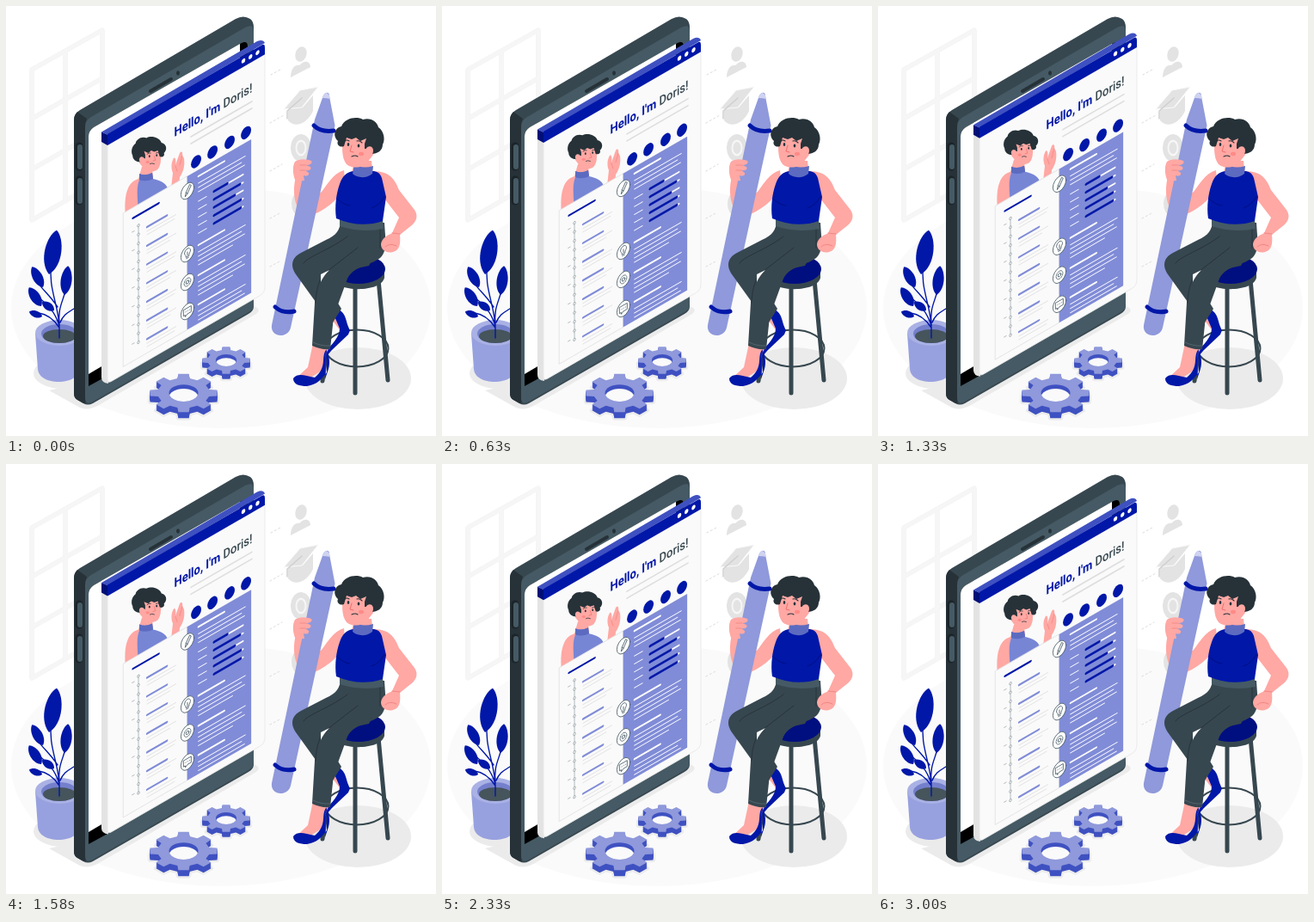
An HTML page for the animation above (3040 ms loop, 500 by 500 pixels).

```html
<!DOCTYPE html>
<html lang="en">
<head>
<meta charset="utf-8">
<title>Online resume</title>
<style>
html, body { margin: 0; width: 100%; height: 100%; overflow: hidden; background: #fff; }
svg { display: block; width: 100vw; height: 100vh; }
text { font: 700 15px Roboto, Arial, sans-serif; }
tspan { font-weight: 500; }
.blue { fill: #0017a8; }
.lilac { fill: #8f99db; }
.skin { fill: #ffa8a4; }
.dark { fill: #37474f; }
.ink { fill: #263238; }
.grey { fill: #e3e3e3; }
.line { fill: none; stroke-linecap: round; stroke-linejoin: round; }
</style>
</head>
<body>
<svg viewBox="0 0 500 500">
  <ellipse cx="250" cy="351" rx="244" ry="140" fill="#fafafa"/>

  <!-- window -->
  <g class="line" stroke="#ebebeb" stroke-width="5">
    <path id="frame" d="M30 74 112 28V202L30 249ZM69 52V227M30 131 112 84M30 190 112 143"/>
    <use href="#frame" stroke="#f6f6f6"/>
  </g>

  <!-- floor shadows -->
  <g fill="#ebebeb">
    <ellipse cx="66" cy="427" rx="34" ry="18"/>
    <path d="M50 447 86 467Q96 471 108 464L291 358Q296 354 292 351L284 347 80 440Z"/>
    <ellipse cx="409" cy="433" rx="62" ry="36"/>
  </g>

  <!-- faint career icons -->
  <path class="line" d="M308 80l13-7M307 136l16-9M307 192l14-8M307 247l13-7M307 303l13-7" stroke="#dcdcdc" stroke-dasharray="2 3"/>
  <g class="grey">
    <ellipse cx="343" cy="56" rx="6.5" ry="9" transform="rotate(18 343 56)"/>
    <path d="M331 83C331 73 336 68 341 69 347 62 354 64 354 71Z"/>
    <path d="M328 119 345 118 357 104V122C350 138 335 142 328 133Z"/>
    <path d="M323 120 342 98 363 94 344 118Z" stroke="#fafafa"/>
    <path class="line" d="M344 107 327 122V131" stroke="#cfcfcf" stroke-width="1.5"/>
    <ellipse class="line" cx="343" cy="165" rx="10" ry="14" stroke="#e3e3e3" stroke-width="4" stroke-dasharray="4 2"/>
    <ellipse cx="343" cy="165" rx="9" ry="12.500"/>
    <ellipse cx="343" cy="165" rx="6.500" ry="9.500" fill="#f6f6f6"/>
    <ellipse cx="343" cy="165" rx="4.500" ry="7"/>
    <ellipse cx="340" cy="230" rx="8" ry="13"/>
    <ellipse cx="340" cy="288" rx="8" ry="12"/>
  </g>

  <!-- plant -->
  <path d="M34 381 37 422C38 442 84 442 86 422L90 381Z" fill="#98a1df"/>
  <ellipse cx="62" cy="380" rx="28" ry="15" fill="#a9b1e5"/>
  <ellipse cx="62" cy="381" rx="21" ry="11" fill="#7480cc"/>
  <ellipse cx="62" cy="384" rx="19" ry="8" fill="#46545c"/>
  <path class="line" d="M62 386C64 350 48 330 53 300M62 372C60 350 66 345 70 328M60 350C50 335 42 330 36 320M62 372C56 352 45 345 37 338M62 374C54 362 46 358 38 357M63 368C67 358 73 356 79 352" stroke="#0017a8" stroke-width="1.4"/>
  <g id="leaves" class="blue"></g>

  <!-- tablet -->
  <path class="dark" d="M79 133Q79 125 86 121L267 15Q276 10 284 15 288 18 288 25V349Q288 355 282 358L101 462Q95 465 90 462L83 458Q79 456 79 450Z"/>
  <path class="ink" d="M79 133Q79 127 83 123L94 131Q92 135 92 141V458Q94 463 90 462L83 458Q79 456 79 450Z"/>
  <path d="M92 141Q92 133 99 129L278 25Q288 20 288 29V346Q288 353 282 356L101 460Q92 465 92 455Z" fill="#455a64"/>
  <path d="M96 152Q96 145 102 141L274 43Q281 40 281 47V334L100 439Q96 441 96 437Z"/>
  <path d="M96 152Q96 145 102 141L272 44V334L96 435Z" fill="#fff"/>
  <path d="M96 428 118 415V430L96 442Z"/>
  <path class="line" d="M168 99 192 85" stroke="#263238" stroke-width="4"/>
  <ellipse class="ink" cx="200" cy="78" rx="2" ry="2.7"/>
  <path class="line" d="M85 163V187M85 202V227" stroke="#1b2429" stroke-width="9"/>
  <path class="line" d="M86 164V187M86 203V227" stroke="#455a64" stroke-width="6"/>

  <!-- floating page -->
  <g id="page">
    <path d="M111 157 119 162V439Q111 438 111 432Z" fill="#e3e3e3"/>
    <path d="M111 146.500 118 149.500V162L111 158Z" fill="#000f78"/>
    <path d="M111 146.500 292 41Q299 38 301 43L118 150Z" fill="#3f51c1"/>
    <g id="sheet" transform="matrix(.866 -.5 0 1 118 162)">
      <path d="M0 0H211.300V271Q211 277 205 277H5Q0 277 0 272Z" fill="#fafafa" stroke="#e6e6e6" stroke-width=".8"/>
      <path class="blue" d="M0-13H207Q211.300-13 211.300-8V0H0Z"/>
      <g fill="#fff"><circle cx="182.500" cy="-7" r="2.600"/><circle cx="192" cy="-7" r="2.600"/><circle cx="201.500" cy="-7" r="2.600"/></g>
      <text class="blue" x="89.500" y="35">Hello, I'm <tspan class="dark">Doris!</tspan></text>
      <g class="blue"><circle cx="119" cy="78.400" r="6.900"/><circle cx="141" cy="78.400" r="6.900"/><circle cx="164" cy="78.400" r="6.900"/><circle cx="186" cy="78.400" r="6.900"/></g>
    </g>
    <path class="skin" d="M139 245C137 222 140 205 154 201L158 187H170L171 202 184 208 160 245Z"/>
    <path d="M155 195Q162 198 170 194L171 201C180 203 186 206 188 212V235L153 245C155 230 150 215 155 202Z" fill="#7785d5"/>
    <path d="M155 195Q162 198 170 194L171 201Q163 205 155 202Z" fill="#5c6bc0"/>
    <use href="#head" transform="matrix(-.7 0 0 .7 453.800 61)"/>
    <path class="skin" d="M192 212 194 194C191 187 193 180 195 177 197 175 198 180 197 185L202 171C204 168 206 170 205 174L207 177C208 184 207 192 202 199L201 212Z"/>
    <path class="line" d="M197 186 199 192M205 174 202 185" stroke="#f0837f" stroke-width=".7"/>
    <g id="cards" transform="matrix(.866 -.5 0 1 118 162)"></g>
  </g>

  <g id="gears"></g>

  <!-- far arm, then the pencil it holds -->
  <path class="skin" d="M393 191C380 195 374 207 367 216L353 226 355 200 344 189 336 203C332 225 340 245 353 244 370 239 386 225 395 211Z"/>
  <path class="lilac" d="M372 101Q376 100 376 105L382.500 139 331 374C328 387 307 386 309 371L359 132 369 104Q370 102 372 101Z"/>
  <path d="M369 104Q372 98 376 104L377 108Q372 107 368 107Z" fill="#cfd3f1"/>
  <path class="line" d="M358 139Q366 147 381 145M313 350Q322 358 335 355" stroke="#0017a8" stroke-width="5" stroke-linecap="butt"/>
  <path class="skin" d="M337 204C333 196 333 186 336 181 341 177 350 178 355 180 357 183 353 185 349 185L354 187C356 191 351 192 348 191L352 194C353 198 348 198 346 197L347 203Z"/>
  <path class="line" d="M349 185 342 185M348 191 342 191" stroke="#f0837f" stroke-width=".8"/>

  <!-- stool -->
  <g class="line" stroke="#37474f">
    <ellipse cx="408" cy="398" rx="36.500" ry="21.500" stroke-width="2"/>
    <path d="M384 318 368 436M406 328V450M433 318 444 435" stroke-width="5"/>
  </g>
  <path class="dark" d="M379 307V316C382 333 436 334 440 316V305Z"/>
  <ellipse cx="410" cy="306" rx="31" ry="17" fill="#000f80"/>

  <!-- seated woman -->
  <path class="skin" d="M383 345 395 369 389 378 380 366Z"/>
  <path class="blue" d="M386 352C397 359 394 366 400 377L398 382 379 400 372 408 370 404C379 393 388 385 388 375L382 361Z"/>
  <path class="dark" d="M389 249C389 260 384 267 372 272L343 287C331 293 331 303 337 312L360 344 380 368 390 352 366 314 422 302 439 270 437 250Z"/>
  <path class="skin" d="M357 392 377 395C372 403 371 412 367 424L351 434 334 436 351 420Z"/>
  <path class="blue" d="M372 399C377 407 377 418 374 425L371 434 372 400C366 408 374 420 359 432 347 430 340 426 334 433 334 440 341 442 350 442 362 440 367 434 373 426Z"/>
  <path class="dark" d="M440 252C441 270 444 285 435 293 421 303 405 302 397 317L381 361 377 399Q366 400 356 395L359 345C361 323 366 313 376 307L407 283 420 251Z"/>
  <path class="line" d="M409 281 378 305C365 314 361 325 360 345M397 268C376 284 351 291 346 299M435 258V281" stroke="#263238" stroke-width=".9"/>
  <path class="line" d="M357 391Q367 396 377 395" stroke="#52646d"/>
  <path d="M366 312 376 307Q369 314 366 321Z" fill="#fff"/>
  <path d="M388 246Q413 256 438 249L439 259Q412 264 388 256Z" fill="#455a64"/>

  <path class="skin" d="M401 199 405 180H425L427 198 415 207Z"/>
  <path class="skin" d="M427 192C448 192 453 204 457 214L475 237C479 243 478 249 473 254L458 266C459 276 458 284 450 286 443 288 436 284 436 277 437 270 443 267 449 264L457 246 440 224Z"/>
  <path class="line" d="M441 280Q446 275 454 279M449 264 458 265" stroke="#f0837f" stroke-width=".9"/>
  <path class="blue" d="M404 192Q415 199 426 192C431 192 435 194 437 200L442 222 438 250Q412 259 384 247C382 233 384 218 388 207 391 198 396 193 404 192Z"/>
  <path d="M405 184Q414 190 427 186L426 195C419 201 408 200 403 195Z" fill="#5c6bc0"/>
  <path class="line" d="M386 225Q394 232 400 232M440 222Q434 232 425 235" stroke="#000f80"/>

  <g id="head">
    <path class="skin" d="M393 148C390 162 390 177 396 184 403 190 415 188 420 182L427 173 424 145Z"/>
    <path class="ink" d="M393 163C388 165 384 161 386 157 380 152 381 142 390 140 394 130 408 128 415 132 424 129 432 135 433 141 440 146 441 156 438 161 438 168 432 172 425 172L421 166 417 166 417 160 419 154 412 157 407 153 402 155 396 153Z"/>
    <path class="skin" d="M418 167C421 161 427 163 427 168 427 173 423 177 419 175Z"/>
    <g class="ink"><ellipse cx="398" cy="161" rx="1.300" ry="2"/><ellipse cx="410" cy="162.500" rx="1.300" ry="2"/></g>
    <path class="line" d="M394 157Q396 155 399 157M408 157Q411 156 414 159M402 175Q406 173 409 175" stroke="#263238" stroke-width="1.100"/>
    <path class="line" d="M402 162 400 169 404 170" stroke="#ed716d" stroke-width="1"/>
    <ellipse cx="413" cy="172" rx="3" ry="2.200" fill="#ff8a86"/>
  </g>
</svg>

<script>
const $ = id => document.getElementById(id);
const line = (u1, u2, v, color, w) =>
  `<path d="M${u1} ${v}H${u2}" stroke="${color}" stroke-width="${w}" stroke-linecap="round"/>`;

// Leaf: base point, length, width, tilt in degrees
const leaf = ([x, y, l, w, a]) =>
  `<path transform="translate(${x} ${y}) rotate(${a})" d="M0 0C${-w} ${-l * .25} ${-w * .7} ${-l * .85} 0 ${-l}C${w * .7} ${-l * .85} ${w} ${-l * .25} 0 0"/>`;
$('leaves').innerHTML = [
  [50, 312, 52, 15, 10], [68, 336, 34, 10, 7], [43, 327, 27, 9, -28],
  [41, 349, 26, 9, -33], [42, 361, 16, 6, -70], [56, 354, 17, 7, -55]
].map(leaf).join('');

function gear(cx, cy, R, depth) {
  const teeth = 8, pts = [];
  for (let i = 0; i < teeth; i++) {
    for (const [k, r] of [[-.3, .77], [-.2, 1], [.2, 1], [.3, .77]]) {
      const a = (i + k) * 2 * Math.PI / teeth;
      pts.push([cx + R * r * Math.cos(a), cy + R * r * .57 * Math.sin(a)].map(n => n.toFixed(1)));
    }
  }
  const hole = (dy, fill) =>
    `<ellipse cx="${cx}" cy="${cy + dy}" rx="${R * .43}" ry="${R * .25}" fill="${fill}"/>`;
  const body = (dy, fill, extra = '') =>
    `<polygon points="${pts.join(' ')}" transform="translate(0 ${dy})" fill="${fill}" ${extra}/>`;
  let out = body(depth, '#ececec', 'stroke="#ececec" stroke-width="5" stroke-linejoin="round"');
  for (let d = depth; d > 0; d--) out += body(d, '#3f51c1');
  const clip = `hole${cx}`;
  return out + body(0, '#8f99db') + hole(0, '#3f51c1') +
    `<clipPath id="${clip}">${hole(0, '#000')}</clipPath><g clip-path="url(#${clip})">${hole(depth * .7, '#fafafa')}</g>`;
}
$('gears').innerHTML = gear(256, 412, 28, 6) + gear(206.5, 450, 39.5, 7);

// Page content in isometric coordinates
const white = '#fff', pale = '#dedede', blue = '#0017a8', slate = '#455a64';
$('sheet').innerHTML += line(112, 194, 46, pale, 1.8) + line(112, 194, 54, pale, 1.8);

let cards = `<rect x="21" y="89.400" width="86" height="178.600" fill="#fafafa" stroke="#e0e0e0" stroke-width=".8"/>
  <rect x="107" y="89.400" width="86" height="178.600" fill="#808cd7"/>`;

cards += line(34, 69, 101.700, blue, 2.4);
cards += `<path d="M41.600 114V250" stroke="#9aa3a8" stroke-width=".7"/>`;
for (let i = 0; i < 14; i++)
  cards += `<circle cx="41.600" cy="${114 + i * 10.45}" r="1.500" fill="#fff" stroke="#78868d" stroke-width=".6"/>`;
for (let i = 0; i < 7; i++) {
  const v = 121.500 + i * 21.700;
  cards += line(33, 36, v - 4, '#b5bbbe', 1) + line(53, 80, v, '#808cd7', 2.4) +
    line(53, 92, v + 5, pale, .8) + line(53, i % 2 ? 84 : 90, v + 9, pale, .8);
}

const block = (v, n) => {
  cards += line(122, 157, v, white, 2.2);
  for (let i = 1; i <= n; i++) cards += line(122, [185, 180, 184, 168][i - 1], v + 3 + i * 5, white, 1);
};
block(97, 3);
block(177, 4);
block(212, 4);
block(246, 3);

[18, 35, 28, 36, 36].forEach((w, i) => {
  const v = 125 + i * 9.3;
  cards += line(122, 133, v + 1, white, 1) + line(143, 182, v, white, 2) + line(143, 143 + w, v, blue, 3);
});

const icons = [
  '<path d="M-3 5-2 1 3-6 5-4 0 3ZM-2 1 0 3"/>',
  '<path d="M-2 3C-2 0-4 0-4-2A4 4 0 0 1 4-2C4 0 2 0 2 3ZM-1.500 5H1.500M0 2V-2"/>',
  '<circle r="4.500" stroke-dasharray="2 1"/><circle r="2"/>',
  '<path d="M-5-4H5V3H0L-3 5V3H-5ZM-2.500-.5h.3M0-.5h.3M2.500-.5h.3"/>'
];
[106.7, 179.7, 212.7, 246.7].forEach((v, i) => {
  cards += `<g class="line" transform="translate(107.400 ${v})" stroke="${slate}" stroke-width=".8"><circle r="8.800" fill="#fff"/>${icons[i]}</g>`;
});
$('cards').innerHTML = cards;

const LOOP = 3040, STEPS = 73, RISE = 8.6;
const start = performance.now();
function draw(now) {
  const t = Math.max(0, now - start) % LOOP;
  const phase = Math.floor(t / LOOP * STEPS + .05) / STEPS;
  const y = -RISE * (1 - Math.cos(2 * Math.PI * phase)) / 2;
  $('page').setAttribute('transform', `translate(0 ${y.toFixed(3)})`);
  requestAnimationFrame(draw);
}
draw(start);
</script>
</body>
</html>
```
